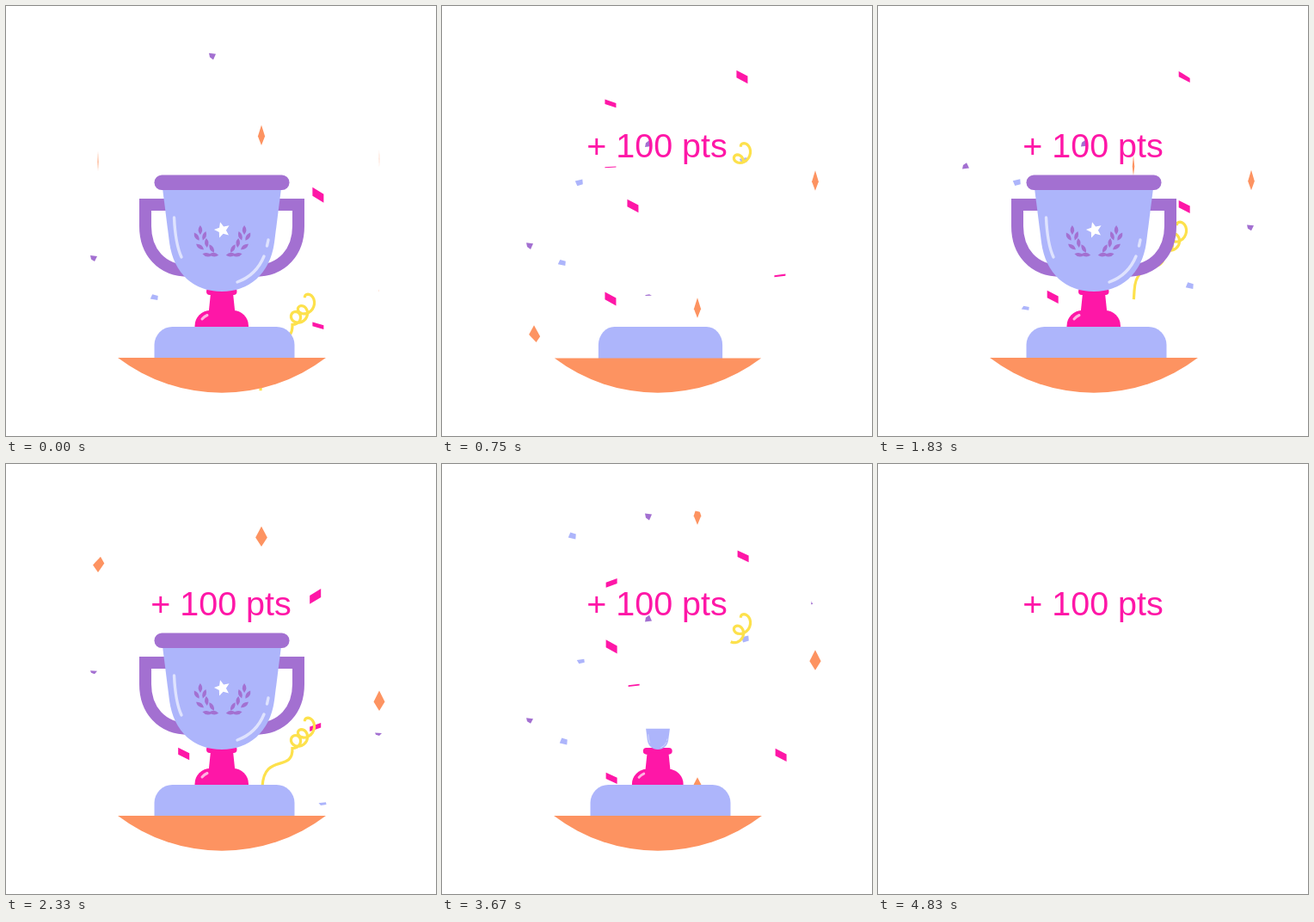
An HTML page with a canvas that plays this animation: 500x500 px, repeating every 5680 ms.

```html
<!DOCTYPE html>
<html>
<head>
<meta charset="utf-8">
<style>
html, body { margin: 0; width: 100%; height: 100%; overflow: hidden; background: #fff; }
canvas { display: block; width: 500px; height: 500px; }
</style>
</head>
<body>
<canvas id="stage" width="500" height="500"></canvas>
<script>
const ctx = document.getElementById('stage').getContext('2d');
const LOOP = 5680, SHOW_END = 4830, TEXT_START = 670;
const CYCLE = 2703, CYCLE_START = 290, STEP = 1000 / 24, HOLD = 42, REF = 1333;
const STAGE = { x: 251, y: 249.7, r: 200 };
const ORANGE = '#fd9361', LAVENDER = '#adb5fb', PURPLE = '#a370d1', PINK = '#fe17a7', GOLD = '#fde14c';
const SHINE = '#dfe3fe';

const clamp = v => Math.max(0, Math.min(1, v));
const progress = (p, start, length) => clamp((p - start) / length);
const easeOut = v => 1 - (1 - v) ** 3;
const smooth = v => v * v * (3 - 2 * v);
const rad = deg => deg * Math.PI / 180;
const polar = (cx, cy, r, deg) => [cx + r * Math.cos(rad(deg)), cy + r * Math.sin(rad(deg))];

// Pieces fall at a steady speed and flip over every `flip` pixels of height.
// Each column is an x followed by the heights of its pieces at REF.
const CONFETTI = [
  { color: PINK, speed: .145, drift: .007, flip: 64.2, offset: 61,
    shape: [[-6.5, -9], [6.5, -1], [6.5, 9], [-6.5, 1]],
    columns: [[200, 198, 272, 425], [226, 317], [397, 398], [353, 167, 15]] },
  { color: ORANGE, speed: .1455, drift: 0, flip: 147, offset: 30.5, sideways: true,
    shape: [[0, -12], [7.5, 1], [0, 11.5], [-7.5, 1]],
    columns: [[297, 436, 119, -55], [434, 461, 288, 136, -29], [107, 468, -25]] },
  { color: LAVENDER, speed: .14, drift: .0115, flip: 119, offset: 20,
    shape: [[-2, -4], [4.5, -2], [4, 4], [-4.5, 2]],
    columns: [[166, 287], [146, 380], [156, 141], [357, 261]] },
  { color: PURPLE, speed: .113, drift: 0, flip: 105, offset: 14,
    shape: [[-4, -4], [4, -3], [1, 4], [-3, 1]],
    columns: [[102, 345, 134], [240, 520, 402, 226, 108, -101], [433, 206]] }
];

function polygon(points) {
  ctx.beginPath();
  points.forEach(([x, y]) => ctx.lineTo(x, y));
  ctx.closePath();
  ctx.fill();
}

function at(x, y, sx, sy, draw) {
  ctx.save();
  ctx.translate(x, y);
  ctx.scale(sx, sy);
  ctx.translate(-x, -y);
  draw();
  ctx.restore();
}

function box(x, y, w, h, r) {
  ctx.beginPath();
  ctx.roundRect(x, y, w, h, r);
  ctx.fill();
}

function line(path, color, width, cap = 'round') {
  ctx.strokeStyle = color;
  ctx.lineWidth = width;
  ctx.lineCap = cap;
  ctx.stroke(new Path2D(path));
}

function drawConfetti(p) {
  ctx.save();
  ctx.beginPath();
  ctx.arc(STAGE.x, STAGE.y, STAGE.r, 0, 2 * Math.PI);
  ctx.clip();
  ctx.globalAlpha = progress(p, CYCLE_START, 260);
  for (const { color, speed, drift, flip, offset, sideways, shape, columns } of CONFETTI) {
    ctx.fillStyle = color;
    for (const [x0, ...heights] of columns) {
      const x = x0 + drift * (p - REF);
      for (const height of heights) {
        const y = height + speed * (p - REF);
        const turn = Math.sin(Math.PI * (y - offset) / flip);
        polygon(shape.map(([u, v]) => sideways ? [x + u * turn, y + v] : [x + u, y + v * turn]));
      }
    }
  }
  ctx.restore();
}

// A coil that winds down to the left and runs out into a wavy tail.
function drawStreamer(p) {
  ctx.save();
  ctx.translate(0, 213 + .088 * (p - REF));
  ctx.beginPath();
  for (let n = 0; n <= 2.75; n += .05) {
    ctx.lineTo(...polar(355 - 8 * n, 2 + 24 * Math.sin(n * Math.PI / 5), 7.5, 180 + 360 * n));
  }
  ctx.bezierCurveTo(334, 62, 300, 38, 298, 78);
  ctx.lineTo(296, 110);
  ctx.setLineDash([Math.max(0, .13 * (p - 235)), 999]);
  ctx.strokeStyle = GOLD;
  ctx.lineWidth = 3.2;
  ctx.stroke();
  ctx.restore();
}

function drawHandle(p, side, length) {
  const angle = 60 * (1 - progress(p, 1190, length)) ** 2;
  ctx.save();
  ctx.translate(251, 0);
  ctx.scale(side, 1);
  ctx.translate(-41, 315);
  ctx.rotate(rad(angle));
  ctx.translate(-210, -315);
  line('M210 231H162V256C162 285 180 308 213 308', PURPLE, 14, 'butt');
  ctx.restore();
}

function drawBowl() {
  ctx.fillStyle = LAVENDER;
  ctx.fill(new Path2D('M182 212H320L312 275C307 312 282 332 251 332C219 332 195 312 190 275Z'));
  line('M195.5 246Q197 277 204 292M269 321Q291 313 300 291M305 272L303.5 279', SHINE, 3.4);
}

function drawStem() {
  ctx.fillStyle = PINK;
  box(233, 328, 35.5, 8, 4);
  polygon([[238, 334], [264, 334], [266.5, 358], [235.5, 358]]);
  box(219.5, 354, 62.5, 20, [18, 18, 0, 0]);
  line('M228 364Q230.5 361 234 359.5', '#ffb3e2', 3);
}

function leaf(r, deg, tilt) {
  ctx.save();
  ctx.translate(...polar(251.5, 265, r, deg));
  ctx.rotate(rad(deg + tilt));
  ctx.fill(new Path2D('M0-5.5Q4.5 0 0 5.5Q-4.5 0 0-5.5Z'));
  ctx.restore();
}

function drawLaurel() {
  ctx.fillStyle = PURPLE;
  for (const side of [1, -1]) at(251.5, 0, side, 1, () => {
    leaf(26, 190, -10);
    leaf(26, 112, -15);
    for (let deg = 174; deg > 120; deg -= 24) {
      leaf(30, deg, -25);
      leaf(21, deg, 25);
    }
  });
}

function drawStar() {
  ctx.fillStyle = '#fff';
  polygon(Array.from({ length: 10 }, (_, i) => polar(251.5, 260.5, i % 2 ? 4.4 : 9.6, i * 36 - 105)));
}

function drawTrophy(p) {
  const stem = easeOut(progress(p, 780, 220));
  const bowl = easeOut(progress(p, 900, 300));
  const rim = easeOut(progress(p, 1050, 230));
  const laurel = smooth(progress(p, 1325, 230));
  const star = easeOut(progress(p, 1540, 220));
  if (p > 1250) {
    drawHandle(p, 1, 515);
    drawHandle(p, -1, 340);
  }
  if (stem) at(251, 373, stem, stem, drawStem);
  if (bowl) at(251, 332, bowl, bowl, drawBowl);
  if (rim) at(251, 214, rim, 1, () => {
    ctx.fillStyle = PURPLE;
    box(172.5, 196.5, 157, 17.5, 8.7);
  });
  if (laurel) at(250.5, 293, laurel, laurel, drawLaurel);
  if (star) at(251.5, 260.5, star, star, drawStar);
}

function drawStand(p) {
  const block = easeOut(progress(p, 560, 370));
  const rise = easeOut(progress(p, 560, 180));
  if (block) at(254, 410, block, rise, () => {
    ctx.fillStyle = LAVENDER;
    box(172.5, 373, 163, 38, [21, 21, 0, 0]);
  });
  const depth = 40.7 * easeOut(progress(p, 325, 560));
  const a = Math.asin(1 - depth / STAGE.r);
  ctx.fillStyle = ORANGE;
  ctx.beginPath();
  ctx.arc(STAGE.x, STAGE.y, STAGE.r, a, Math.PI - a);
  ctx.closePath();
  ctx.fill();
}

// The show runs at 24 steps a second and pauses for one step at two moments.
function phase(time) {
  const t = Math.floor(time / STEP + .15) * STEP;
  const held = [300, 900].reduce((sum, start) => sum + HOLD * progress(t, start, HOLD), 0);
  return (t + HOLD - held - CYCLE_START + CYCLE) % CYCLE + CYCLE_START;
}

function render(time) {
  ctx.fillStyle = '#fff';
  ctx.fillRect(0, 0, 500, 500);
  if (time < SHOW_END) {
    const p = phase(time);
    drawConfetti(p);
    drawStreamer(p);
    drawTrophy(p);
    drawStand(p);
  }
  if (time >= TEXT_START) {
    ctx.fillStyle = PINK;
    ctx.font = '39.5px "Liberation Sans", Arial, sans-serif';
    ctx.textAlign = 'center';
    ctx.fillText('+ 100 pts', 250, 175.5);
  }
}

const begin = performance.now();
function tick() {
  render((performance.now() - begin) % LOOP);
  requestAnimationFrame(tick);
}
tick();
</script>
</body>
</html>
```
